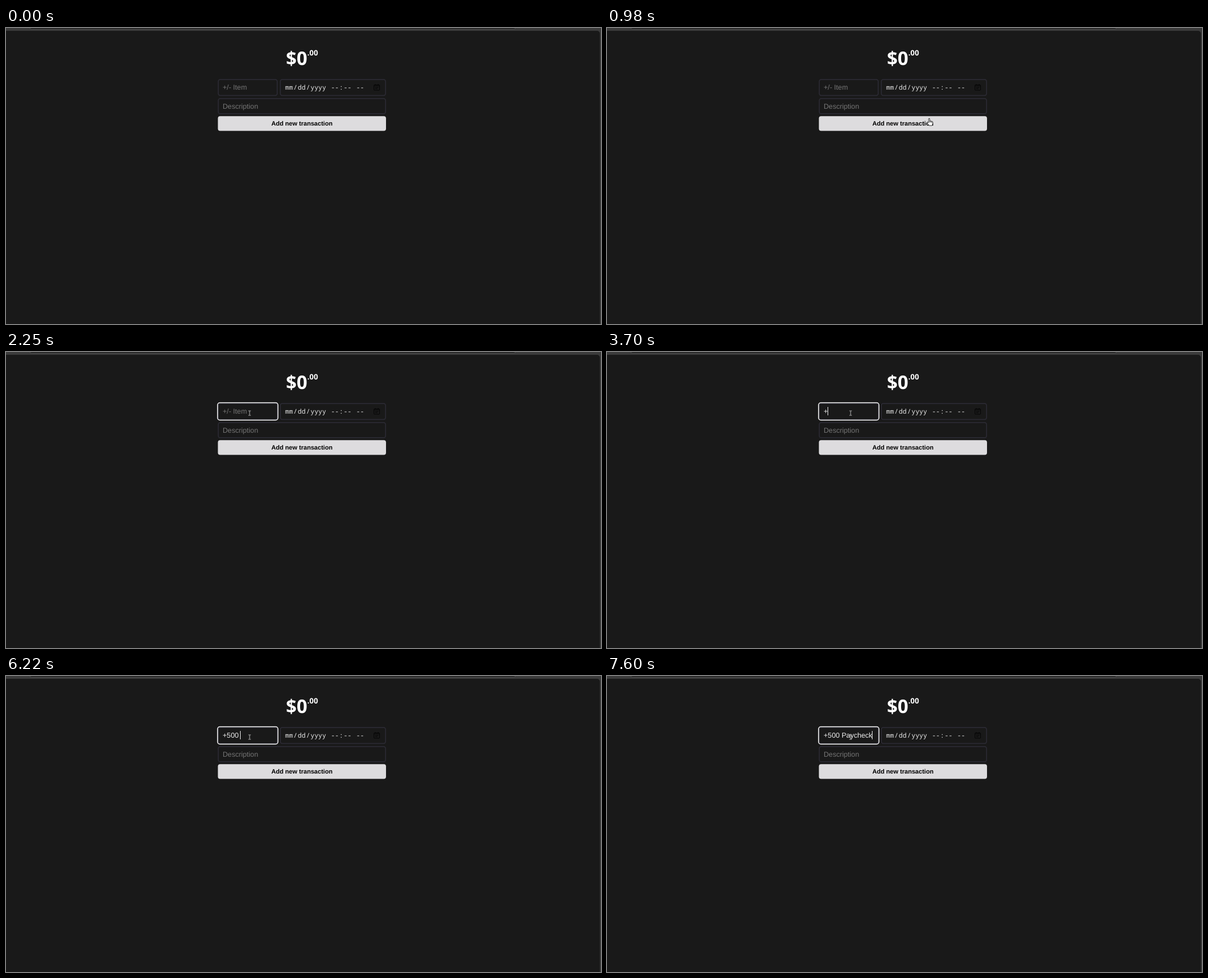
An HTML page that plays this animation: 1060x528 px, repeating every 8 s.

```html
<!DOCTYPE html>
<html lang="en">
<head>
<meta charset="utf-8">
<title>Transactions</title>
<style>
  html, body { margin: 0; height: 100%; overflow: hidden; background: #191919; }
  svg { display: block; width: 1060px; height: 528px; }
  text { font: 12.64px "Liberation Sans", Arial, sans-serif; white-space: pre; text-rendering: geometricPrecision; }
  .hint { fill: #757575; }
  .field { fill: #191919; stroke: #2b2a33; stroke-width: 1.7; }
  .total { font: bold 33.3px "Noto Sans", "Open Sans", sans-serif; fill: #fff; }
  .cents { font-size: 13.3px; }
  .date { font: 11.6px "Noto Sans Mono", monospace; fill: #e8e8e8; }
  .label { font-weight: bold; font-size: 11.1px; text-anchor: middle; }
</style>
</head>
<body>
<svg viewBox="0 0 1060 528">
  <rect width="1060" height="528" fill="#3b3b3b"/>
  <rect x="42" y="-12" width="866" height="14.5" rx="4" fill="#282828" stroke="#555" stroke-width=".8"/>
  <rect x="-6" y="5" width="1064" height="540" rx="5" fill="#191919"/>

  <text class="total" x="498.7" y="66">$0</text>
  <text class="total cents" x="536.8" y="49">.00</text>

  <rect class="field" x="378.2" y="91.9" width="105" height="28.4" rx="3.5"/>
  <rect class="field" x="488.7" y="91.9" width="187.5" height="28.4" rx="3.5"/>
  <rect class="field" x="378.2" y="125.9" width="298" height="27" rx="3.5"/>
  <rect x="377.5" y="157.2" width="299.5" height="26.3" rx="4" fill="#dddcde"/>

  <text class="date" x="497.3" y="110.4"
    dx="0 0 .83 .83 0 .83 .83 0 0 0 .83 .83 0 .83 .83 0 .83 .83 0">mm/dd/yyyy --:-- --</text>
  <g fill="none" stroke="#050505">
    <rect x="655.5" y="101.5" width="10" height="9.5" rx="1"/>
    <path d="M655.5 103.2h10M657.5 106h6M657.5 108.3h4M657.8 100v2M663.2 100v2"/>
  </g>
  <text class="hint" x="386" y="143.5">Description</text>
  <text class="label" x="527.2" y="174">Add new transaction</text>

  <rect id="ring" x="376.9" y="90.6" width="107.6" height="30.9" rx="4" fill="none" stroke="#fff" stroke-width="1.5"/>
  <text id="hint" class="hint" x="386" y="110">+/- Item</text>
  <text id="entry" x="386" y="110" fill="#eee"></text>
  <rect id="caret" y="98" width="1" height="15" fill="#eee"/>

  <g id="pointer">
    <path id="arrow" d="M.4 .4V9l2-1.8 1.3 2.7 1.3-.6-1.2-2.6h2.7z" fill="#fff" stroke="#000" stroke-width=".7"/>
    <path id="hand" d="M-1 .8Q0-.6 1 .8V5Q2 4 2.9 5.2 3.9 4.6 4.6 5.7 6 5.2 6.3 6.6V9.4Q6.2 11 5.2 13H-.2Q-1.2 11-3.6 8 -4 6.4-2.6 6.6L-1 8zM1 5V7.5M2.9 5.4V7.6M4.6 5.8V7.8" fill="#fff" stroke="#000" stroke-width=".8"/>
    <path id="beam" d="M-2.2-4H-.6L0-3.5 .6-4H2.2M0-3.5V3.5M-2.2 4H-.6L0 3.5 .6 4H2.2" fill="none" stroke="#ccc" stroke-width=".9"/>
  </g>
</svg>
<script>
const LOOP = 8000, FOCUS = 1720, BLINK = 530;
const $ = id => document.getElementById(id);
const show = (id, on) => $(id).setAttribute('visibility', on ? 'visible' : 'hidden');

// [time, x, y, shape]
const moves = [
  [250, 969, 517, 'arrow'], [320, 760, 425, 'arrow'], [390, 500, 325, 'arrow'], [460, 348, 276, 'arrow'],
  [720, 390, 262, 'arrow'], [790, 500, 238, 'arrow'], [850, 630, 215, 'arrow'], [920, 677, 190, 'arrow'],
  [980, 574, 161, 'hand'], [1050, 470, 88, 'arrow'], [1120, 380, 35, 'arrow'], [1180, 300, 9, 'arrow'],
  [1250, 264, 30, 'arrow'], [1320, 300, 75, 'arrow'], [1380, 390, 104, 'beam'], [1450, 434, 109, 'beam'],
  [1580, 434, 110, 'beam'], [FOCUS, 434, 109, 'beam']
];

// [time, number of characters entered]
const value = '+500 Paycheck';
const keys = [
  [FOCUS, 0], [3700, 1], [4330, 3], [4430, 4], [5160, 5], [6680, 6],
  [6940, 7], [7040, 8], [7140, 9], [7240, 10], [7340, 11], [7530, 12], [7600, 13]
];

const latest = (list, t) => list.filter(item => item[0] <= t).pop();

function draw(t) {
  const move = latest(moves, t);
  for (const shape of ['arrow', 'hand', 'beam']) show(shape, move && move[3] === shape);
  if (move) $('pointer').setAttribute('transform', `translate(${move[1]} ${move[2]})`);

  const [time, count] = latest(keys, t) || [0, 0];
  const focused = t >= FOCUS;
  show('ring', focused);
  show('hint', !count);
  $('entry').textContent = value.slice(0, count);
  const width = count ? $('entry').getComputedTextLength() : 0;
  $('caret').setAttribute('x', Math.floor(386 + width));
  show('caret', focused && Math.floor((t - time) / BLINK) % 2 === 0);
}

const start = performance.now();
function tick() {
  draw((performance.now() - start) % LOOP);
  requestAnimationFrame(tick);
}
tick();
</script>
</body>
</html>
```
